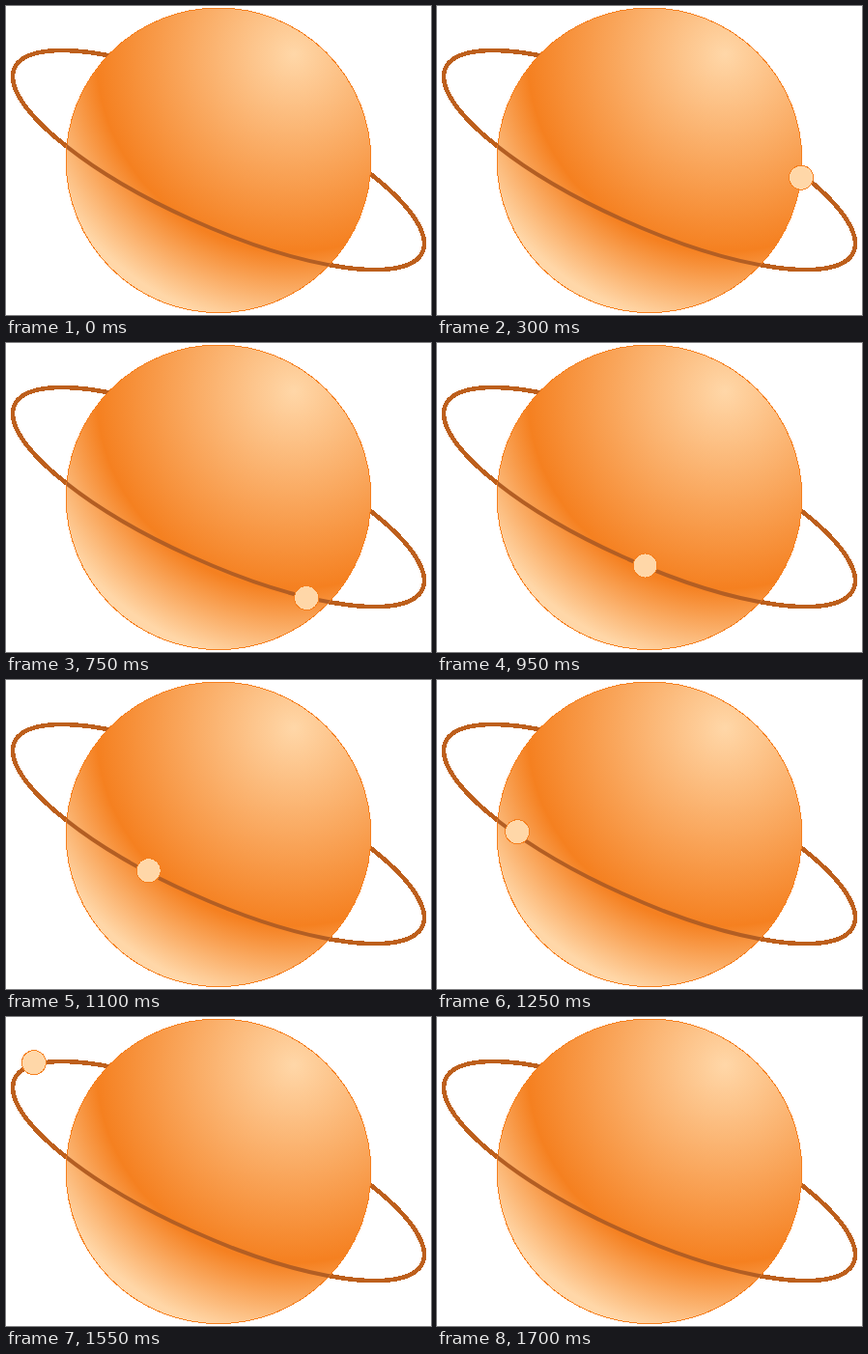
Animation, 440 px wide and 320 px high, one loop 2000 ms. Source, as an HTML page:

```html
<!DOCTYPE html>
<html lang="en">
<head>
<meta charset="utf-8">
<title>Planet with moon</title>
<style>
  html, body { margin: 0; width: 100%; height: 100%; overflow: hidden; background: #fff; }
  svg { display: block; width: 440px; height: 320px; }
  .ring { fill: none; stroke: #bd5f1c; stroke-width: 4.6; shape-rendering: crispEdges; }
  .front { stroke: #b35e23; stroke-width: 4; shape-rendering: auto; }
  .body { stroke: #f58020; shape-rendering: crispEdges; }
</style>
</head>
<body>
<svg viewBox="0 0 440 320">
  <defs>
    <radialGradient id="shade" gradientUnits="userSpaceOnUse" cx="298" cy="50" r="284">
      <stop offset="0" stop-color="#ffd7a8"/>
      <stop offset=".72" stop-color="#f58020"/>
      <stop offset="1" stop-color="#ffd7a8"/>
    </radialGradient>
    <clipPath id="disc"><circle cx="220" cy="159.8" r="158"/></clipPath>
  </defs>
  <ellipse class="ring" rx="231.7" ry="67.7" transform="translate(220 159.6) rotate(24.3)"/>
  <circle class="body" cx="220" cy="159.8" r="157.8" fill="url(#shade)"/>
  <g clip-path="url(#disc)">
    <path class="ring front" d="M231.7 0A231.7 67.7 0 0 1 -231.7 0" transform="translate(220 159.6) rotate(24.3)"/>
  </g>
  <g transform="translate(220 159.8) rotate(25.2)">
    <ellipse id="orbit" rx="232.2" ry="66.3" fill="none"/>
    <circle id="moon" class="body" r="12.5" fill="#ffd7a8"/>
  </g>
</svg>
<script>
  const LOOP = 2000, STEP = 50, RISE = 300, SET = 1700;
  const orbit = document.getElementById('orbit');
  const moon = document.getElementById('moon');
  const length = orbit.getTotalLength();

  // Constant speed along the orbit, starting behind the planet.
  function draw(now) {
    const t = Math.floor((now % LOOP) / STEP) * STEP;
    const turn = (t / LOOP + 0.749) % 1;
    const p = orbit.getPointAtLength(turn * length);
    moon.setAttribute('cx', p.x);
    moon.setAttribute('cy', p.y);
    moon.style.visibility = t >= RISE && t < SET ? 'visible' : 'hidden';
  }

  const start = performance.now();
  function tick() {
    draw(performance.now() - start);
    requestAnimationFrame(tick);
  }
  tick();
</script>
</body>
</html>
```
